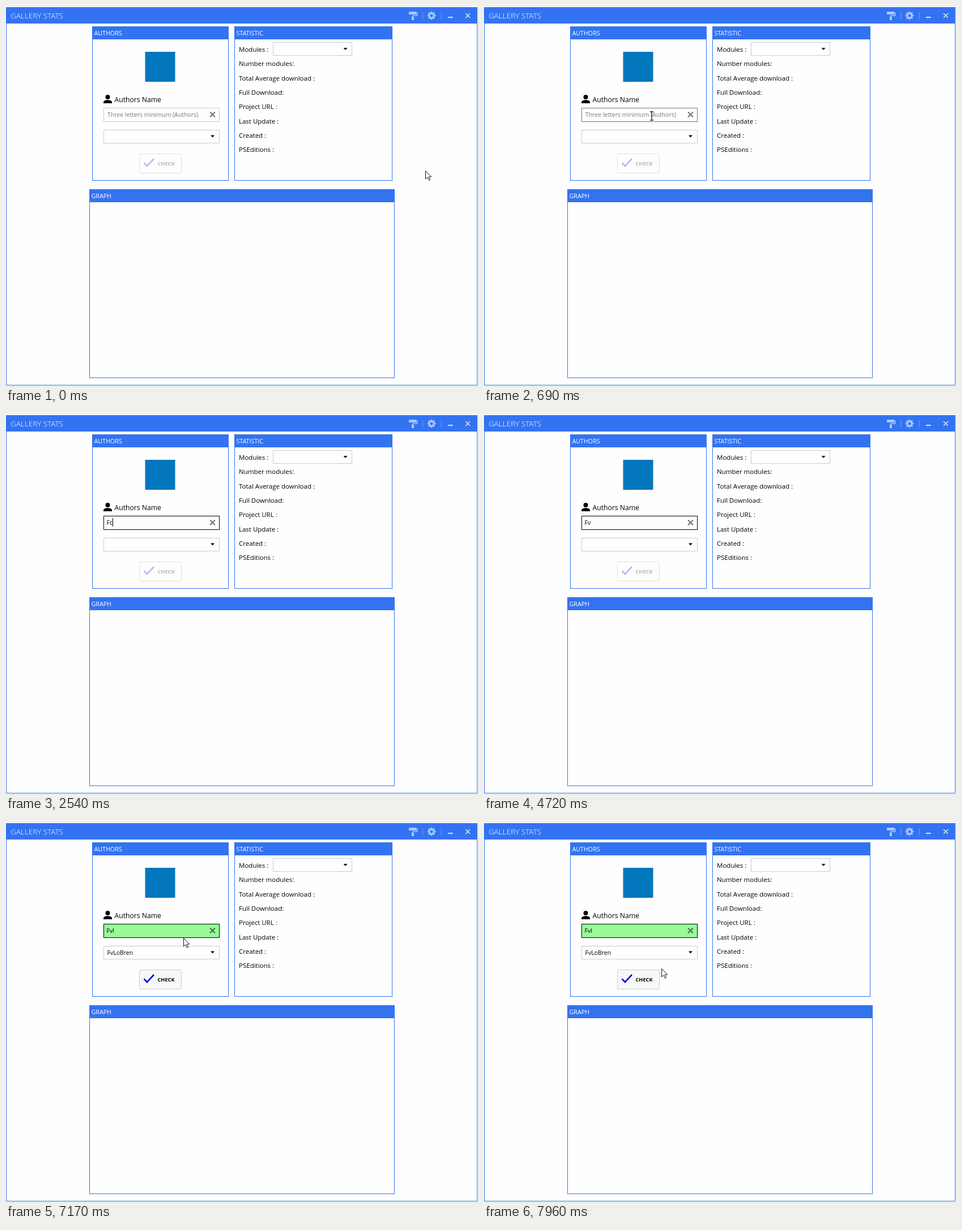
An HTML page that plays this animation: 833x672 px, repeating every 8 s.

```html
<!DOCTYPE html>
<html lang="en">
<head>
<meta charset="utf-8">
<title>Gallery stats</title>
<style>
  html, body { margin: 0; width: 100%; height: 100%; overflow: hidden; background: #fefefe; }
  svg { display: block; width: 833px; height: 672px; font: 11.5px "Open Sans", "Noto Sans", sans-serif; }
  text { white-space: pre; }
  .title { font-size: 13.5px; font-weight: 300; fill: #fff; }
  .head { font-size: 10.7px; fill: #fff; }
  .input { font-size: 10.5px; }
  .field { fill: #fefefe; stroke: #ccc; }
  .tools { fill: none; stroke: #abc6fb; }
  .solid { fill: #abc6fb; stroke: none; }
</style>
</head>
<body>
<svg viewBox="0 0 833 672">
  <rect width="833" height="672" fill="#fefefe"/>
  <path d="M.5 2V670.5H831.5V2" fill="none" stroke="#3373f2"/>
  <rect y="2" width="832" height="29" fill="#3373f2"/>
  <text class="title" x="8" y="22">GALLERY STATS</text>

  <g class="tools">
    <path class="solid" d="M711 10h13v5h-13zM716 19h4v6h-4z"/>
    <path d="M724 12h1.5v5H718v2" stroke-width="1.5"/>
    <path d="M735.5 11v13M768.5 11v13" stroke="#6f9cf6"/>
    <circle cx="751" cy="17" r="4.2" stroke-width="3.4"/>
    <circle cx="751" cy="17" r="6.3" stroke-width="2.2" pathLength="16" stroke-dasharray="1 1" stroke-dashoffset=".5"/>
    <path d="M780 20h8.5" stroke="#d5e2fd" stroke-width="2"/>
    <path d="M811 13l8 8m0-8l-8 8" stroke="#d5e2fd" stroke-width="1.6"/>
  </g>

  <g id="panels"></g>
  <rect x="245.5" y="81" width="53" height="53" fill="#0277bd"/>

  <circle cx="179.5" cy="161" r="4"/>
  <path d="M172 172v-2c0-2.5 4-3.8 7.5-3.8s7.5 1.3 7.5 3.8v2z"/>
  <text x="191.5" y="170" font-size="12.2">Authors Name</text>

  <rect id="box" class="field" x="172.5" y="180.5" width="204" height="24"/>
  <text id="hint" class="input" x="179" y="196" fill="#777">Three letters minimum (Authors)</text>
  <text id="typed" class="input" x="177.5" y="196"></text>
  <rect id="caret" y="184" width="1" height="15"/>
  <path d="M360 187.500l9 9m0-9l-9 9" stroke="#000" stroke-opacity=".55" stroke-width="2"/>

  <rect id="combo" class="field" x="172.5" y="219.500" width="204" height="23"/>
  <text id="author" class="input" x="178.500" y="235">FvLoBren</text>
  <path d="M361 228.500h7l-3.500 4z"/>

  <rect id="button" x="235.500" y="261.500" width="74" height="34" rx="2"/>
  <g id="label">
    <path d="M243.500 277.500l5.500 5.500 12-13" fill="none" stroke="#00d" stroke-width="2.600"/>
    <text x="267.500" y="282" font-size="9.200" font-weight="700">CHECK</text>
  </g>

  <rect class="field" x="471.500" y="64.500" width="139" height="23"/>
  <path d="M595.500 74h7l-3.500 4z"/>
  <g id="stats"></g>

  <path id="arrow" d="M.5 .5v14.500l3.300-3.200 2.500 5.400 2.200-1-2.400-5.200h4.600z" fill="#fff" stroke="#111"/>
  <path id="beam" d="M-3-7h2.500L0-6.500.5-7H3M0-6.500v14M-3 8h2.500L0 7.500.5 8H3" fill="none" stroke="#222" stroke-width="1.300"/>
</svg>
<script>
const LOOP = 8000;
const $ = id => document.getElementById(id);
const set = (id, attrs) => {
  for (const name in attrs) $(id).setAttribute(name, attrs[name]);
};
const clamp = v => Math.max(0, Math.min(1, v));
const progress = (t, from, to) => clamp((t - from) / (to - from));

const panel = (name, x, y, w, h) => `
  <rect x="${x + .5}" y="${y + .5}" width="${w}" height="${h}" fill="none" stroke="#3373f2"/>
  <rect x="${x}" y="${y}" width="${w + 1}" height="23" fill="#3373f2"/>
  <text class="head" x="${x + 3.5}" y="${y + 16}">${name}</text>`;
$('panels').innerHTML = panel('AUTHORS', 152, 36, 240, 272) +
  panel('STATISTIC', 403, 36, 278, 272) + panel('GRAPH', 147, 324, 538, 333);

$('stats').innerHTML = ['Modules :', 'Number modules:', 'Total Average download :', 'Full Download:',
  'Project URL :', 'Last Update :', 'Created :', 'PSEditions :']
  .map((label, i) => `<text x="411" y="${Math.round(81 + i * 25.3)}">${label}</text>`).join('');

// [start, text]
const typing = [[0, ''], [2220, 'F'], [2540, 'Fc'], [3100, 'F'], [3200, 'Fv'], [6250, 'Fvl']];
const caretOn = [[1150, 1660], [2220, 3050], [3100, 3750], [4260, 4720], [6250, 6810], [7320, 7830]];
// [time, x, y] of the pointer's hot spot
const moves = [[30, 740, 291], [690, 296, 194], [7040, 296, 194], [7400, 354, 229],
  [7600, 368, 229], [7830, 368, 229], [7960, 313, 259]];

function pointerAt(t) {
  const next = moves.findIndex(m => m[0] > t);
  if (next === 0) return moves[0].slice(1);
  if (next < 0) return moves.at(-1).slice(1);
  const [t0, x0, y0] = moves[next - 1], [t1, x1, y1] = moves[next];
  const p = progress(t, t0, t1), e = p * p * (3 - 2 * p);
  return [x0 + (x1 - x0) * e, y0 + (y1 - y0) * e];
}

function draw(t) {
  const [x, y] = pointerAt(t).map(Math.round);
  const inside = (top, bottom) => x >= 172 && x <= 376 && y >= top && y <= bottom;
  const overBox = inside(180, 204), overCombo = inside(219, 242);
  const hidden = t >= 2220 && t < 7040;
  const place = `translate(${x} ${y})`;
  set('arrow', { transform: place, visibility: hidden || overBox ? 'hidden' : 'visible' });
  set('beam', { transform: place, visibility: !hidden && overBox ? 'visible' : 'hidden' });

  const found = t >= 6250;
  const shade = Math.round(119 * (1 - progress(t, 1100, 1270)));
  const border = t >= 1100 ? `rgb(${shade},${shade},${shade})` : overBox ? '#777' : '#ccc';
  $('box').style.stroke = border;
  $('box').style.fill = found ? '#98fb98' : '#fefefe';
  set('hint', { opacity: 1 - progress(t, 2200, 2400) });

  $('typed').textContent = typing.findLast(([start]) => t >= start)[1];
  set('caret', {
    x: 178 + Math.round($('typed').getComputedTextLength()),
    visibility: caretOn.some(([on, off]) => t >= on && t < off) ? 'visible' : 'hidden'
  });

  $('combo').style.fill = overCombo ? '#ebebeb' : '#fefefe';
  $('combo').style.stroke = overCombo ? '#777' : '#ccc';
  set('author', { visibility: found ? 'visible' : 'hidden' });
  set('button', { fill: found ? '#f7f7f7' : '#fdfdfd', stroke: found ? '#ccc' : '#e0e0e0' });
  set('label', { opacity: found ? 1 : .27 });
}

const start = performance.now();
function tick() {
  draw((performance.now() - start) % LOOP);
  requestAnimationFrame(tick);
}
tick();
</script>
</body>
</html>
```
